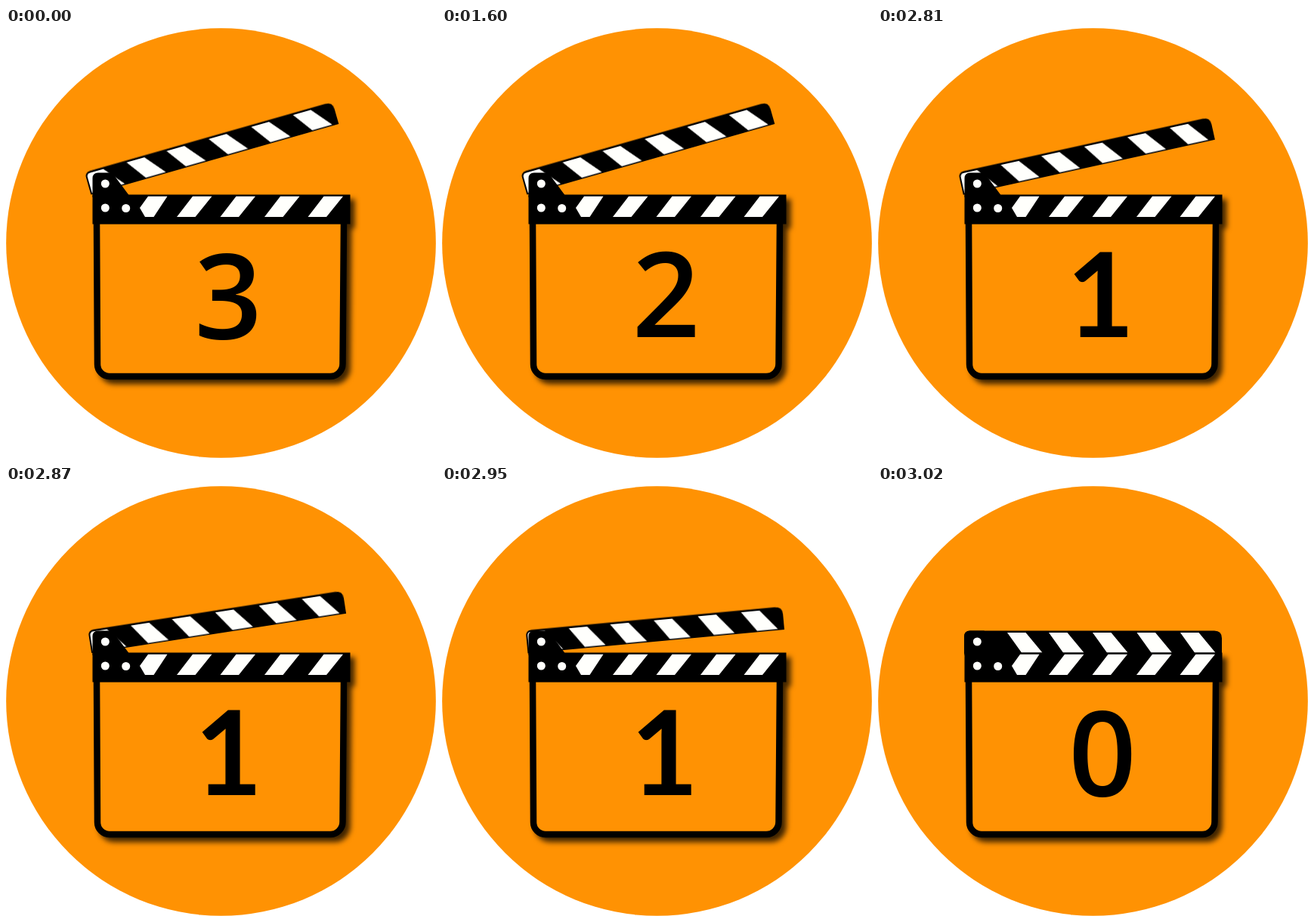
Animation of 569 by 569 pixels, one loop 3050 ms. Source, as an HTML page without scripts:

```html
<!DOCTYPE html>
<html lang="en">
<head>
<meta charset="utf-8">
<title>Clapperboard countdown</title>
<style>
  html, body { margin: 0; width: 100%; height: 100%; overflow: hidden; background: #fff; }
  svg { display: block; width: 100%; height: 100%; }

  .slate { filter: drop-shadow(6px 6px 3.5px rgba(0, 0, 0, .75)); }
  .white { fill: #fffffc; }

  .arm {
    transform-origin: 107.4px 227px;
    animation: clap 3050ms infinite;
  }
  .digit {
    font: 600 157px "Open Sans", sans-serif;
    text-anchor: middle;
    visibility: hidden;
    animation: 3050ms step-end infinite;
  }
  .three { animation-name: three; }
  .two { animation-name: two; }
  .one { font: 700 155px Lato, sans-serif; animation-name: one; }
  .zero { animation-name: zero; }

  /* The arm drops in nine even steps of 30 ms */
  @keyframes clap {
    0% { transform: rotate(-15.9deg); animation-timing-function: step-end; }
    90.164% { transform: rotate(-15.9deg); animation-timing-function: steps(9, end); }
    99.016%, 100% { transform: rotate(0deg); }
  }
  @keyframes three {
    0% { visibility: visible; }
    32.787%, 100% { visibility: hidden; }
  }
  @keyframes two {
    0% { visibility: hidden; }
    32.787% { visibility: visible; }
    65.574%, 100% { visibility: hidden; }
  }
  @keyframes one {
    0% { visibility: hidden; }
    65.574% { visibility: visible; }
    99.016%, 100% { visibility: hidden; }
  }
  @keyframes zero {
    0% { visibility: hidden; }
    99.016%, 100% { visibility: visible; }
  }
</style>
</head>
<body>
<svg viewBox="0 0 569 569">
  <defs>
    <path id="down" d="M171 194h24.500l22 26.500h-27.500z"/>
    <path id="up" d="M247 222.700h25.500l-22 27.300h-24.500z"/>
  </defs>

  <circle cx="284.500" cy="284.500" r="284.300" fill="#ff9203"/>

  <g class="arm">
    <path d="M114 222V199q0-7.500 7.500-7.500H445q10 0 10 10V222z"/>
    <g class="white">
      <path d="M116 220.500V199q0-5 5-5H139l22 26.500z"/>
      <use href="#down"/>
      <use href="#down" x="55"/>
      <use href="#down" x="113"/>
      <use href="#down" x="171.500"/>
      <use href="#down" x="229"/>
    </g>
  </g>

  <g class="slate">
    <path d="M120 255L121 445A16 16 0 0 0 137 461H429A16.500 16.500 0 0 0 445.500 444.500L447 255z"
          fill="#ff9203" stroke="#000" stroke-width="8.500"/>
    <path d="M114.500 220.500H455.500V259.500H114.500z"/>
  </g>
  <path d="M114.500 224V199q0-7.500 7.500-7.500H140.500L162.500 221V224z"/>

  <g class="white">
    <path d="M188 222.700h25.500L195.500 250H184L177 238z"/>
    <use href="#up"/>
    <use href="#up" x="57.500"/>
    <use href="#up" x="116"/>
    <use href="#up" x="173.500"/>
    <circle cx="131.300" cy="206" r="5.500"/>
    <circle cx="131.300" cy="238" r="5.500"/>
    <circle cx="158.700" cy="238.500" r="5.500"/>
  </g>

  <text class="digit three" x="294" y="411">3</text>
  <text class="digit two" x="296.500" y="408.500">2</text>
  <text class="digit one" x="294.500" y="408.500">1</text>
  <text class="digit zero" x="297" y="409.500">0</text>
</svg>
</body>
</html>
```
